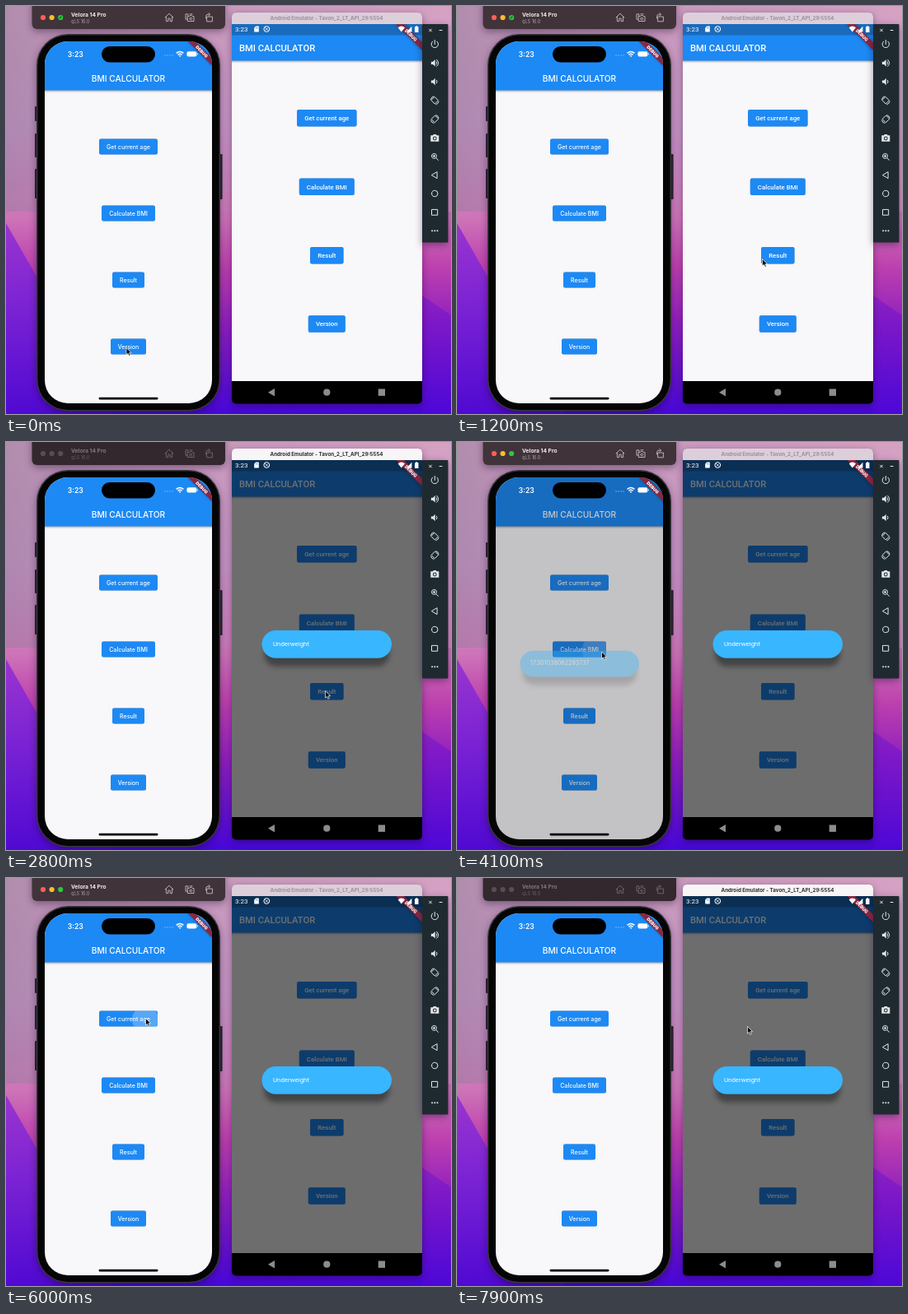
An HTML page that plays this animation: 540 px wide and 496 px high, repeating every 8 s.

```html
<!DOCTYPE html>
<html lang="en">
<head>
<meta charset="utf-8">
<title>BMI calculator on two devices</title>
<style>
  html, body { margin: 0; width: 100%; height: 100%; overflow: hidden; background: #c08abc; }
  svg { display: block; width: 540px; height: 496px; }
  text { white-space: pre; }
  .inter { font-family: Inter, sans-serif; }
  .roboto { font-family: Roboto, sans-serif; }
  .line { fill: none; stroke: currentColor; stroke-width: 1; stroke-linecap: round; stroke-linejoin: round; }
  .solid { fill: currentColor; }
  .btn { filter: drop-shadow(0 .9px .7px rgba(0,0,0,.33)); }
  .bar { filter: drop-shadow(0 1.2px 1.3px rgba(0,0,0,.38)); }
  .win { filter: drop-shadow(0 3px 5px rgba(20,0,40,.4)); }

  #tools { color: #b9afb4; }
  #tools .bg { fill: #40343a; }
  #tools .name { fill: #f1ebee; }
  #tools .sub { fill: #a99ea4; }
  .away #tools { color: #6e6268; }
  .away #tools .bg { fill: #33282e; }
  .away #tools .name { fill: #82767c; }
  .away #tools .sub { fill: #685c62; }
  .away #tools .lamp { fill: #594d53; }
  .away #tools .mark { display: none; }
  #head .bg { fill: #dccfda; }
  #head text { fill: #9b8f99; }
  .away #head .bg { fill: #f8f5f7; }
  .away #head text { fill: #2d2a2d; }
</style>
</head>
<body>
<svg id="stage" viewBox="0 0 540 496" xmlns="http://www.w3.org/2000/svg"></svg>
<script>
const LOOP = 8000, STEP = 100;
const BLUE = '#1d89f4';
const stage = document.getElementById('stage');

const rect = (x, y, w, h, r, fill, more = '') =>
  `<rect x="${x}" y="${y}" width="${w}" height="${h}" rx="${r}" fill="${fill}" ${more}/>`;
const disc = (x, y, r, fill, more = '') =>
  `<circle cx="${x}" cy="${y}" r="${r}" fill="${fill}" ${more}/>`;
const text = (x, y, size, weight, font, str, more = 'fill="#fff"') =>
  `<text x="${x}" y="${y}" font-size="${size}" font-weight="${weight}" class="${font}" ${more}>${str}</text>`;
const icon = (x, y, line, solid = '') =>
  `<g transform="translate(${x} ${y})"><path class="line" d="${line}"/><path class="solid" d="${solid}"/></g>`;
const grad = (id, dir, stops) =>
  `<linearGradient id="${id}" ${dir}>${stops.map(([o, c]) =>
    `<stop offset="${o}" stop-color="${c}"/>`).join('')}</linearGradient>`;

// The two app screens; k is pixels per logical pixel.
const screens = [
  { id: 'a', font: 'inter', k: .515, x: 47, y: 43, w: 203, h: 440, r: 28,
    barEnd: 102.5, title: [148.5, 92, 10.2, 'middle'], mid: 148.5, btnH: 19, size: 7.1,
    btns: [['Get current age', 71, 171], ['Calculate BMI', 65, 252], ['Result', 39, 333], ['Version', 43, 414]],
    box: [76.5, 253.8, 144.5, 31.6], say: [89, 271] },
  { id: 'b', font: 'roboto', k: .56, x: 274, y: 22, w: 231, h: 434, r: 0,
    barEnd: 66.5, title: [283, 54.8, 11.2, 'start'], mid: 389.3, btnH: 20.4, size: 7.85,
    btns: [['Get current age', 72.5, 136.3], ['Calculate BMI', 67, 219.8], ['Result', 40.5, 303.2], ['Version', 45, 386.5]],
    box: [310.5, 229, 157.5, 33.8], say: [324, 247.8] }
];

function screen(s) {
  const [tx, ty, ts, anchor] = s.title, [bx, by, bw, bh] = s.box, k = s.k;
  const buttons = s.btns.map(([label, w, cy], i) => {
    const x = s.mid - w / 2, y = cy - s.btnH / 2;
    return `<clipPath id="${s.id}${i}">${rect(x, y, w, s.btnH, 2.2, '#000')}</clipPath>` +
      rect(x, y, w, s.btnH, 2.2, BLUE, 'class="btn"') +
      `<g clip-path="url(#${s.id}${i})"><circle id="${s.id}wave${i}" fill="#fff" opacity="0"/></g>` +
      text(s.mid, cy + s.size * .36, s.size, 500, s.font, label, 'fill="#fff" text-anchor="middle"');
  }).join('');
  return `<clipPath id="${s.id}clip">${rect(s.x, s.y, s.w, s.h, s.r, '#000')}</clipPath>
    <g clip-path="url(#${s.id}clip)">
      ${rect(s.x, s.y, s.w, s.h, 0, '#f8f7f9')}
      ${rect(s.x - 4, s.y - 4, s.w + 8, s.barEnd - s.y + 4, 0, BLUE, 'class="bar"')}
      ${s.id === 'b' ? rect(s.x, s.y, s.w, 13.5, 0, '#1a6bbb') : ''}
      ${text(tx, ty, ts, 500, s.font, 'BMI CALCULATOR', `fill="#fff" text-anchor="${anchor}"`)}
      ${buttons}
      ${rect(s.x, s.y, s.w, s.h, 0, '#000', `id="${s.id}dim" opacity="0"`)}
      <g id="${s.id}box" opacity="0">
        ${rect(bx + 3, by + 12, bw - 6, bh - 2, 14, '#000', 'opacity=".38" filter="url(#soft)"')}
        ${rect(bx, by, bw, bh, bh / 2, '#38b6ff')}
        ${text(s.say[0], s.say[1], s.size, 400, s.font, '', `fill="#fff" id="${s.id}say"`)}
      </g>
      <g transform="translate(${s.x + s.w} ${s.y}) rotate(45) scale(${k})">
        ${rect(-40, 28, 80, 12, 0, '#000', 'opacity=".35" filter="url(#soft)"')}
        ${rect(-40, 28, 80, 12, 0, '#8a2740')}
        ${text(0, 37.7, 10.2, 900, s.font, 'DEBUG', 'fill="#fff" text-anchor="middle"')}
      </g>
    </g>`;
}

const wallpaper = `
  <defs>
    ${grad('sky', 'x2="0" y2="1"', [[0, '#cb9dbe'], [.3, '#c593c5'], [.52, '#ce74b8'], [.64, '#bd40ae'], [.78, '#8f1fbf'], [1, '#4607d8']])}
    ${grad('haze', 'x2="1" y2="0"', [[0, 'rgba(150,125,155,.5)'], [.4, 'rgba(190,140,180,.1)'], [1, 'rgba(235,170,205,.35)']])}
    ${grad('hill', 'x2="0" y2="1"', [[0, '#9a35cf'], [.45, '#7a22d4'], [1, '#5009d2']])}
    <filter id="soft" x="-30%" y="-80%" width="160%" height="260%"><feGaussianBlur stdDeviation="3.4"/></filter>
  </defs>
  ${rect(0, 0, 540, 496, 0, 'url(#sky)')}
  ${rect(0, 0, 540, 250, 0, 'url(#haze)')}
  <path d="M0 264L40 334L130 496H0Z" fill="url(#hill)"/>
  <path d="M505 352L540 376V496H505Z" fill="#5a0bd6" opacity=".35"/>`;

const toolbar = `
  <g id="tools">
    ${rect(31.5, -10, 234.5, 38, 6, '', 'class="bg win"')}
    ${['#fe5f57', '#febc2e', '#2ac840'].map((c, i) => disc(45 + i * 10.6, 14, 3.1, c, 'class="lamp"')).join('')}
    <path class="mark" id="mark" d="M64.8 15.2L67.4 12.7" stroke="#12661d" stroke-width="1.3"/>
    ${text(79, 12.7, 6.7, 700, 'inter name', 'Velora 14 Pro', '')}
    ${text(79, 20.6, 5.6, 400, 'inter sub', 'qLS 16.0', '')}
    ${icon(198, 14, 'M-5 0L0 -4.8L5 0M-3.6 -1V4.6H-1.2V1.2H1.2V4.6H3.6V-1')}
    ${icon(223, 14, 'M-2.2 -2V-4.2H-5V2.2H-3M-2.4 -1.5H-.6L.2 -2.6H2.4L3.2 -1.5H5V4.5H-2.4ZM-.1 1.4a1.4 1.4 0 1 0 2.8 0a1.4 1.4 0 1 0 -2.8 0M0 -4.2H3')}
    ${icon(247, 14, 'M-3 -1H3.4V4.8H-3ZM-4.4 1V-1.5Q-4.4 -3.8 -1.6 -3.8H.2M-1.2 -5.4L.6 -3.8L-1.2 -2.2')}
  </g>`;

const phone = `
  ${[[122, 18], [155, 29], [198, 36]].map(([y, h]) => rect(35, y, 4, h, 1, '#2b2530')).join('')}
  ${rect(258, 180, 4.6, 55, 1, '#2b2530')}
  ${rect(37, 34, 223, 458.5, 38, '#39363b', 'class="win"')}
  ${rect(38.4, 35.4, 220.2, 455.7, 36.8, '#050506')}`;

const phoneStatus = `
  ${rect(116, 49, 65, 19.5, 9.75, '#000')}
  ${text(74.8, 61.7, 8.6, 600, 'inter', '3:23')}
  ${[193, 196, 199, 202].map(x => disc(x, 60, .7, '#8cc2fa')).join('')}
  <path d="M206.6 57.4Q211 53.6 215.4 57.4M208.5 59.4Q211 57.3 213.5 59.4" fill="none" stroke="#fff" stroke-width="1.4"/>
  <path d="M209.6 60.4Q211 59.4 212.4 60.4L211 62Z" fill="#fff"/>
  ${rect(219.4, 55.2, 12, 6.4, 2, '#fff')}${rect(232, 57.3, 1, 2.2, .5, '#b9daf9')}
  ${rect(112.5, 475.8, 72, 2.6, 1.3, '#000')}`;

const emulator = `
  ${rect(274, 8, 231, 475.5, 5, '#000', 'class="win"')}
  <g id="head">
    <path class="bg" d="M274 22V13Q274 8 279 8H500Q505 8 505 13V22Z"/>
    ${text(389, 17.2, 6.25, 700, 'inter', 'Android Emulator - Tavon_2_LT_API_29:5554', 'text-anchor="middle"')}
  </g>`;

const emulatorStatus = `
  ${text(278, 31.2, 8, 400, 'roboto', '3:23')}
  <path d="M301.2 26.6L303.2 24.6H306.8V31.6H301.2Z" fill="#fff"/>
  <path d="M303.4 25.8V27.4M305 25.8V27.4" stroke="#1a6bbb" stroke-width=".7"/>
  <g fill="none" stroke="#fff"><circle cx="316.3" cy="28" r="3.4"/><path d="M314.2 26L318.4 30M315 29.6L317.6 26.6" stroke-width=".8"/></g>
  <path d="M475.6 26.2Q479.8 22.8 484 26.2L479.8 31.6Z M486 31.4L492.4 24.8V31.4Z M496 25.2H497.3V24.3H499.2V25.2H500.5V32H496Z" fill="#fff"/>
  <g fill="#8c8c8c"><path d="M318 469.7L326 465V474.4Z"/><circle cx="389.3" cy="469.7" r="4.1"/><path d="M451.7 465.5H460V473.9H451.7Z"/></g>`;

const turn = 'M0 -4.2L4.2 0L0 4.2L-4.2 0ZM-4.8 -1.4Q-4.2 -4.4 -1.4 -4.9M4.8 1.4Q4.2 4.4 1.4 4.9';
const horn = 'M-4.4 -1.6H-2.2L.4 -4.2V4.2L-2.2 1.6H-4.4Z';
const side = `
  ${rect(505, 22, 31.5, 265.5, 1, '#1f2a30', 'class="win"')}
  <g color="#e4e8ea">
    ${icon(515, 29.5, 'M-1.4 -1.4L1.4 1.4M1.4 -1.4L-1.4 1.4')}
    ${icon(527.6, 29.5, 'M-1.5 0H1.5')}
    <g transform="translate(520.3 0)" stroke-width="1.2">
      ${icon(0, 46.5, 'M0 -5V0M-2.6 -3.4A4.2 4.2 0 1 0 2.6 -3.4')}
      ${icon(0, 69.3, 'M2 -1.6Q3.2 0 2 1.6M2.4 -4Q6.6 0 2.4 4', horn)}
      ${icon(0, 92, 'M2.2 -1.8Q3.6 0 2.2 1.8', horn)}
      ${icon(0, 114.8, turn)}
      <g transform="translate(0 137.5) scale(-1 1)">${icon(0, 0, turn)}</g>
      ${icon(0, 160.3, '', 'M-5 -3H-2.4L-1.4 -4.4H1.4L2.4 -3H5V4.4H-5ZM0 -1.7A2.4 2.4 0 1 0 0 3.1A2.4 2.4 0 1 0 0 -1.7Z')}
      ${disc(0, 161, 1.4, '#e4e8ea')}
      ${icon(-.8, 182.4, 'M-3 0A3 3 0 1 0 3 0A3 3 0 1 0 -3 0M2.2 2.2L5 5M-1.3 0H1.3M0 -1.3V1.3')}
      ${icon(0, 205.4, 'M-3.6 0L2.8 -3.8V3.8Z')}
      ${icon(0, 228, 'M-3.7 0A3.7 3.7 0 1 0 3.7 0A3.7 3.7 0 1 0 -3.7 0')}
      ${icon(0, 250.8, 'M-3.4 -3.4H3.4V3.4H-3.4Z')}
      ${[-3.2, 0, 3.2].map(x => disc(x, 273.2, 1, '#e4e8ea')).join('')}
    </g>
  </g>`;

const arrow = `<path id="arrow" d="M0 0V8.6L2 6.8L3.3 9.8L4.8 9.1L3.5 6.2H6.2Z"
  fill="#050505" stroke="#fff" stroke-width=".7" stroke-linejoin="round"/>`;

stage.innerHTML = wallpaper + toolbar + phone + screen(screens[0]) + phoneStatus +
  emulator + screen(screens[1]) + emulatorStatus + side + arrow;

// time, x, y of the pointer tip
const path = [
  [0, 146, 415.5], [150, 146, 415.5], [1050, 370.5, 307.5], [1300, 370.5, 307.5],
  [1700, 387.5, 302.5], [2850, 387.5, 302.5], [3600, 175.5, 255], [4400, 175.5, 255],
  [5000, 206, 200], [5400, 206, 200], [5700, 169.5, 170.5], [6700, 169.5, 170.5],
  [7100, 207, 186], [7300, 207, 186], [7700, 352.5, 180.5], [8000, 352.5, 180.5]
];
// screen, opens, closes, message
const boxes = [
  ['b', 2160, 9000, 'Underweight'],
  ['a', 4042, 5300, '17.301038062283737'],
  ['a', 6042, 7300, '25']
];
// time, screen, button, x, y
const taps = [[2000, 'b', 2, 387.5, 303], [3900, 'a', 1, 172, 253], [5850, 'a', 0, 169, 172]];

const $ = id => document.getElementById(id);
const set = (id, o) => { for (const n in o) $(id).setAttribute(n, o[n]); };
const clamp = v => Math.min(1, Math.max(0, v));
const smooth = v => v * v * (3 - 2 * v);

function pointer(t) {
  let i = 0;
  while (i < path.length - 2 && path[i + 1][0] <= t) i++;
  const [t0, x0, y0] = path[i], [t1, x1, y1] = path[i + 1];
  const p = smooth(clamp((t - t0) / (t1 - t0)));
  return [x0 + (x1 - x0) * p, y0 + (y1 - y0) * p];
}

function draw(t) {
  const away = (t >= 2000 && t < 3700) || t >= 7700;
  stage.classList.toggle('away', away);
  $('mark').style.display = t < 2000 ? '' : 'none';
  set('arrow', { transform: `translate(${pointer(t)})` });

  for (const { id } of screens) {
    let show = 0, msg = '';
    for (const [on, open, close, say] of boxes) {
      if (on !== id) continue;
      const p = Math.min(clamp((t - open) / 150), 1 - clamp((t - close) / 170));
      if (p > show) { show = p; msg = say; }
    }
    set(id + 'dim', { opacity: .555 * show });
    set(id + 'box', { opacity: show });
    if ($(id + 'say').textContent !== msg) $(id + 'say').textContent = msg;
  }

  for (const [at, on, i, x, y] of taps) {
    const age = t - at, live = age >= 0 && age < 420;
    set(on + 'wave' + i, { cx: x, cy: y, r: live ? 4 + age * .08 : 0, opacity: live ? .25 * (1 - clamp((age - 150) / 270)) : 0 });
  }
}

const start = performance.now();
function tick() {
  const t = (performance.now() - start) % LOOP;
  draw(Math.floor(t / STEP) * STEP);
  requestAnimationFrame(tick);
}
draw(0);
tick();
</script>
</body>
</html>
```
